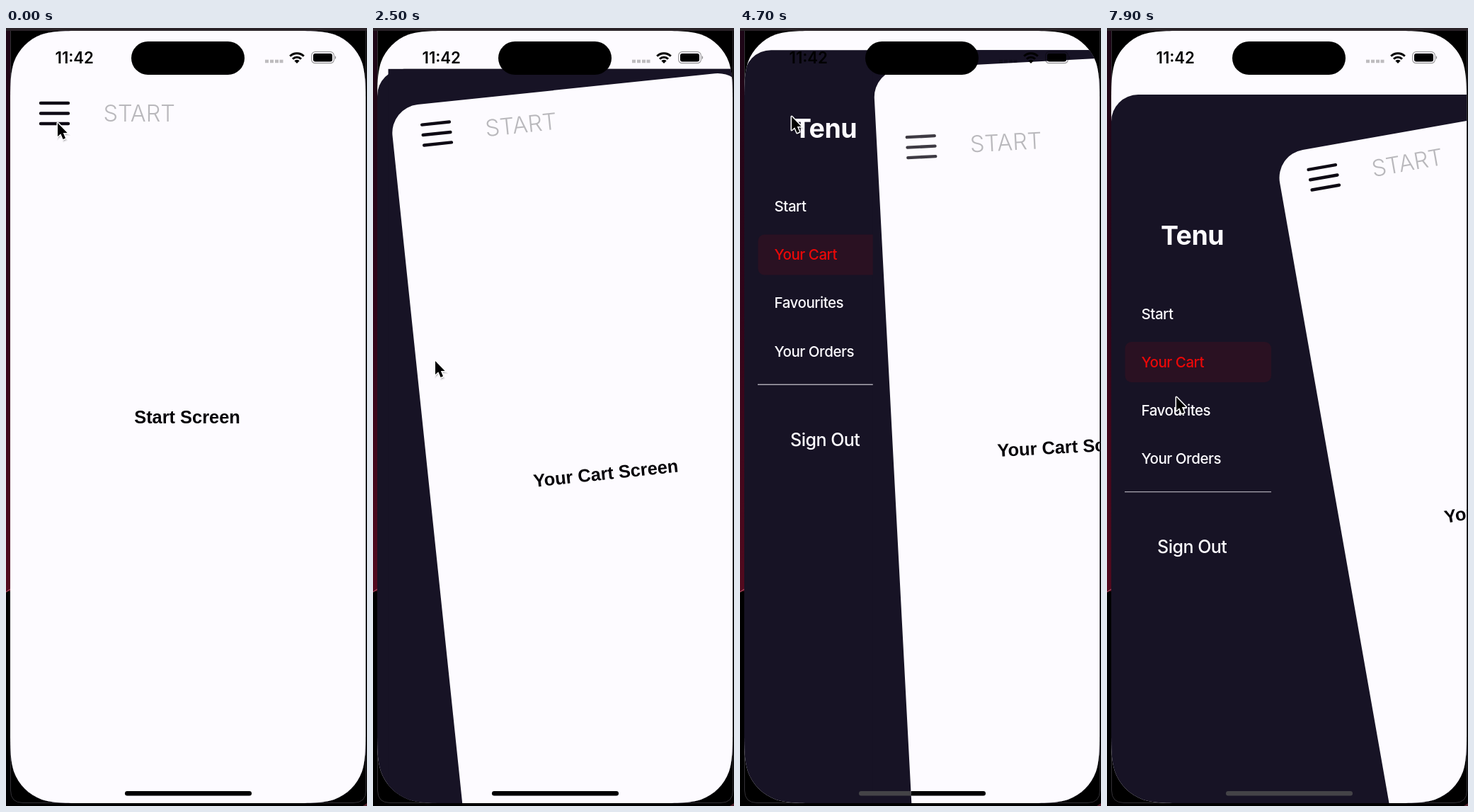
Animation of 510 by 1098 pixels, one loop 8000 ms. Source, as an HTML page:

```html
<!DOCTYPE html>
<html lang="en">
<head>
<meta charset="utf-8">
<title>Rotating drawer menu</title>
<style>
  html, body { margin: 0; width: 100%; height: 100%; overflow: hidden; background: #000; }
  svg { display: block; width: 100%; height: 100%; }
  text { font-family: Inter, "Open Sans", sans-serif; fill: #fdfbff; }
  .item { font-size: 20.5px; font-weight: 500; letter-spacing: -.45px; }
  .item.on { fill: #ea0808; }
  .brand { font-size: 37.5px; font-weight: 700; letter-spacing: -.5px; }
  .out { font-size: 25px; font-weight: 500; letter-spacing: -.5px; }
  .title { font-size: 32.5px; font-weight: 300; fill: #b9b8bc; }
  .body { font: 700 25.4px "Liberation Sans", Arial, sans-serif; fill: #050308; text-anchor: middle; }
  .clock { font-size: 22.2px; font-weight: 600; fill: #000; }
</style>
</head>
<body>
<svg viewBox="0 0 510 1098">
  <defs>
    <linearGradient id="wall" x1="0" y1="0" x2="0" y2="1">
      <stop offset="0" stop-color="#1c0616"/>
      <stop offset=".5" stop-color="#300419"/>
      <stop offset="1" stop-color="#520a1e"/>
    </linearGradient>
    <clipPath id="screen"><path id="outline"/></clipPath>
    <clipPath id="barClip"><rect id="barEdge" x="0" y="1070" width="510" height="20"/></clipPath>
  </defs>

  <!-- desktop and bezel -->
  <rect width="510" height="1098"/>
  <rect width="6" height="795" fill="url(#wall)"/>
  <path d="M0 796L6 792" stroke="#a8485c" stroke-width="1.2"/>
  <rect width="510" height="4" fill="#2a2328"/>
  <path d="M504 1098L510 1094V1098Z" fill="#52202c"/>
  <path d="M6.500 4V1076Q6.500 1093.500 24 1093.500H491Q508.500 1093.500 508.500 1076V4" fill="none" stroke="#333136"/>

  <g clip-path="url(#screen)">
    <rect width="510" height="1098" fill="#fdfbff"/>
    <rect id="panel" x="6" y="4" width="620" height="1200" rx="38" fill="#171325"/>
    <g id="menu">
      <text class="brand" x="76" y="306">Tenu</text>
      <rect id="mark" x="25.500" y="443" width="206.500" height="57" rx="9" fill="#2a1122"/>
      <text class="item" x="48.500" y="410.500">Start</text>
      <text class="item" x="48.500" y="478.700">Your Cart</text>
      <text class="item" x="48.500" y="546.900">Favourites</text>
      <text class="item" x="48.500" y="615">Your Orders</text>
      <path d="M25 654.700H232" stroke="#aaa7b1" stroke-width="1.300"/>
      <text class="out" x="71" y="741">Sign Out</text>
    </g>
    <!-- upright backing that slides with the card and hides the menu -->
    <rect id="backing" y="4" width="700" height="1200" fill="#171325"/>
    <rect x="168" y="1077" width="179" height="6.500" rx="3.250" fill="#444347"/>

    <!-- card, drawn around its own centre -->
    <g id="card">
      <rect x="-251" y="-545" width="502" height="1090" rx="40" fill="#fdfbff"/>
      <g id="head">
        <path id="icon" d="M-208 -443H-169M-208 -428.500H-169M-208 -414H-169" stroke="#0e0a14" stroke-width="4.400" stroke-linecap="round"/>
        <text class="title" x="-119.500" y="-417">START</text>
      </g>
      <text id="label" class="body" x="-1" y="9"></text>
    </g>

    <g clip-path="url(#barClip)">
      <rect x="168" y="1077" width="179" height="6.500" rx="3.250"/>
    </g>

    <!-- status bar -->
    <text class="clock" x="69.500" y="49.700">11:42</text>
    <rect x="177" y="19" width="160" height="47" rx="23.500"/>
    <path d="M366 47H371M373 47H378M380 47H385M386.500 47H391.500" stroke="#000" stroke-opacity=".25" stroke-width="4.500"/>
    <g fill="none" stroke="#000" stroke-width="3">
      <path d="M401.200 39.800A14 14 0 0 1 420.800 39.800"/>
      <path d="M405 43.700A8.500 8.500 0 0 1 417 43.700"/>
    </g>
    <path d="M407.300 46.300A5.300 5.300 0 0 1 414.700 46.300L411 50Z"/>
    <rect x="431.700" y="33.700" width="31.600" height="16" rx="5" fill="none" stroke="#000" stroke-opacity=".4" stroke-width="1.200"/>
    <rect x="434" y="36" width="27" height="11.500" rx="3"/>
    <path d="M464.800 39Q467.500 41.700 464.800 44.500Z" fill-opacity=".5"/>
  </g>

  <g id="cursor">
    <path d="M1 1V20L5.300 16.200L8.600 24L12 22.600L8.800 15H14.600Z" fill="#000" fill-opacity=".22" transform="translate(1 2.500)" stroke="#000" stroke-opacity=".08" stroke-width="3"/>
    <path d="M1 1V20L5.300 16.200L8.600 24L12 22.600L8.800 15H14.600Z" stroke="#fff" stroke-width="3" stroke-linejoin="round" paint-order="stroke"/>
  </g>
</svg>

<script>
  const LOOP = 8000, OPEN1 = 300, CLOSE = 2300, OPEN2 = 4550;
  const $ = id => document.getElementById(id);
  const items = [...document.querySelectorAll('.item')];
  const clamp = v => Math.min(1, Math.max(0, v));
  const set = (id, name, value) => $(id).setAttribute(name, value);

  // continuous-curvature corner, in units of its radius
  const bend = [
    [1.529, 0], [1.088, 0], [0.868, 0], [0.631, 0.075], [0.373, 0.169],
    [0.169, 0.373], [0.075, 0.631], [0, 0.868], [0, 1.088], [0, 1.529]
  ];
  const bendBack = [...bend].reverse();

  function corner(points, x, y, rx, ry) {
    const [first, ...rest] = points.map(([a, b]) => `${x + a * rx} ${y + b * ry}`);
    return `${first}C${rest.join(' ')}`;
  }

  set('outline', 'd', 'M' + [
    corner(bendBack, 6, 4, 70, 70),
    corner(bend, 508, 4, -70, 70),
    corner(bendBack, 508, 1094, -70, -70),
    corner(bend, 6, 1094, 70, -70)
  ].join('L') + 'Z');

  // cursor stops: time, x, y
  const stops = [
    [0, 72, 133], [1000, 72, 133], [1900, 87, 469], [3000, 87, 469],
    [3800, 73, 125], [4500, 73, 125], [4700, 72, 124], [5150, 72, 124],
    [5500, 45, 281], [5900, 62, 420], [6300, 80, 470], [7700, 85, 470], [7900, 97, 520], [8000, 97, 520]
  ];

  function cursorAt(t) {
    const i = stops.findIndex(s => s[0] > t);
    const [a, x, y] = stops[i - 1], [b, u, v] = stops[i];
    const k = (t - a) / (b - a), e = k * k * (3 - 2 * k);
    return [x + (u - x) * e, y + (v - y) * e];
  }

  // opacity of a pressed button: quick dip, slower return
  function press(t, start) {
    const d = t - start;
    if (d < 0) return 1;
    return d < 50 ? 1 - 0.8 * d / 50 : Math.min(1, 0.2 + 0.8 * (d - 50) / 270);
  }

  const linear = d => clamp(d / 500);
  const settle = (d, rate) => d < 0 ? 0 : 1 - Math.exp(-rate * d / 1000);

  function render(t) {
    const p = clamp(linear(t - OPEN1) - linear(t - CLOSE) + linear(t - OPEN2));
    const x = 322 * (settle(t - OPEN1, 7) - settle(t - CLOSE, 7.4) + settle(t - OPEN2, 7));
    const drop = 90 * p;
    const cx = 257 + x, cy = 549 + drop + 33 * (1 - (1 - p) ** 1.6);
    const tilt = 10 * p, rad = tilt * Math.PI / 180;

    set('panel', 'transform', `translate(0 ${drop})`);
    set('menu', 'transform', `translate(0 ${217 * (p - 1)})`);
    set('backing', 'transform', `translate(${1.21 * x - 66.5} ${drop})`);
    set('card', 'transform', `translate(${cx} ${cy}) rotate(${-tilt})`);

    // the header loses its safe-area inset, then settles in one jump
    const settled = t >= 1350 && t < CLOSE + 500 || t >= 5600;
    set('head', 'transform', `translate(0 ${settled ? -73 : -46 * p ** 1.85})`);
    set('icon', 'opacity', press(t, 200) * press(t, 4450));

    const edge = p > 0 ? cx - 251 / Math.cos(rad) + (1080 - cy) * Math.tan(rad) : 0;
    set('barEdge', 'x', edge);

    const chosen = t < CLOSE ? 0 : 1;
    set('mark', 'y', chosen ? 443 : 374.7);
    items.forEach((el, i) => el.classList.toggle('on', i === chosen));
    $('label').textContent = items[chosen].textContent + ' Screen';

    const [mx, my] = cursorAt(t);
    set('cursor', 'transform', `translate(${mx} ${my})`);
  }

  const begin = performance.now();
  function tick() {
    render((performance.now() - begin) % LOOP);
    requestAnimationFrame(tick);
  }
  tick();
</script>
</body>
</html>
```
